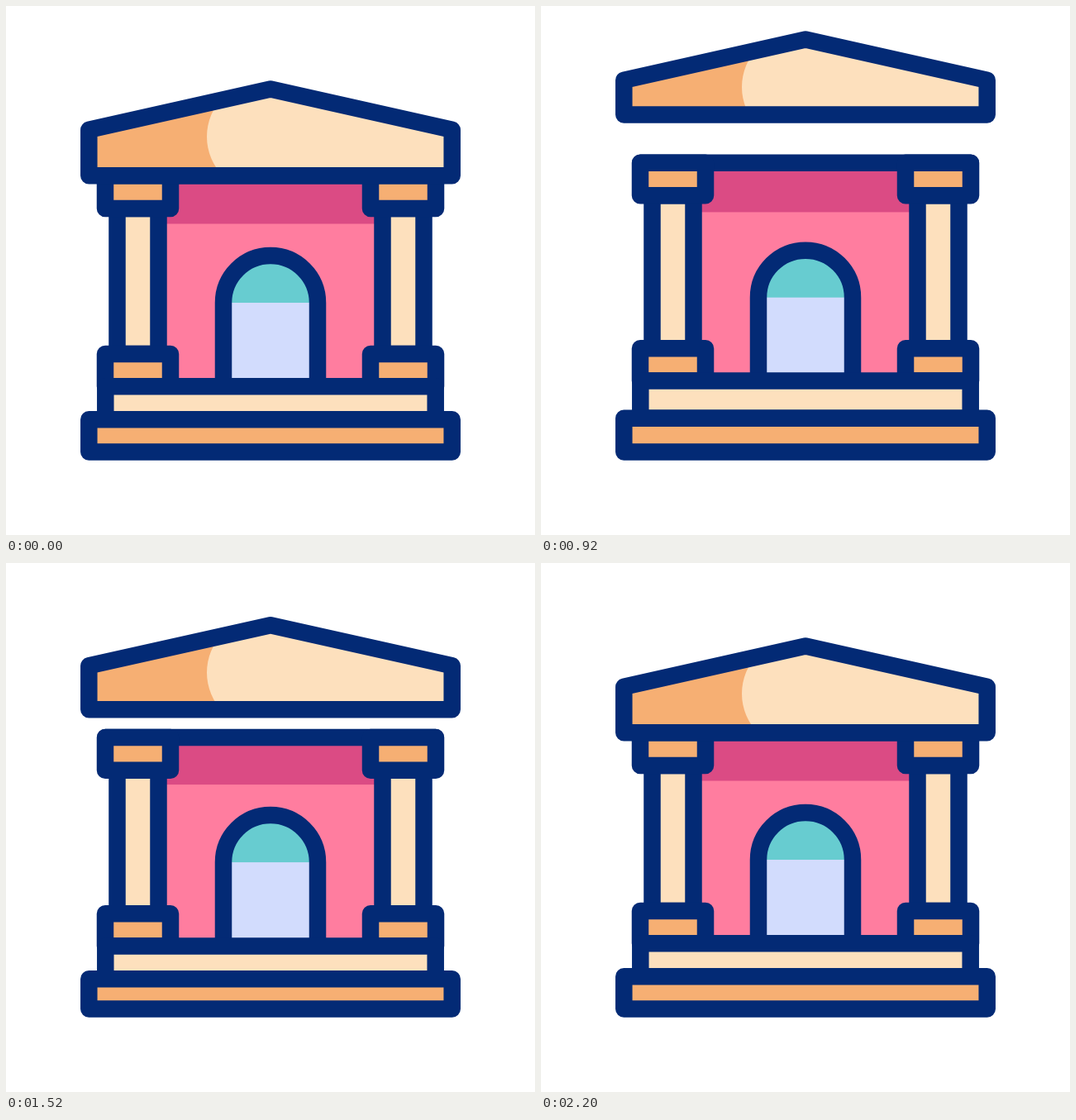
An HTML page with a canvas for the animation above (2.64 s loop, 640 by 640 pixels).

```html
<!DOCTYPE html>
<html lang="en">
<head>
<meta charset="utf-8">
<title>Bouncing bank</title>
<style>
html, body { margin: 0; width: 100%; height: 100%; overflow: hidden; background: #fff; }
canvas { display: block; }
</style>
</head>
<body>
<canvas id="stage" width="640" height="640"></canvas>
<script>
const ctx = document.getElementById('stage').getContext('2d');
const LOOP = 2640, STEP = 40, DELAY = 200;
const NAVY = '#032a75', CREAM = '#fde0bd', ORANGE = '#f6af73', PINK = '#ff7d9f',
      ROSE = '#db4b84', TEAL = '#67ccd0', LILAC = '#d2dcfd';

// Offsets from rest: [squashed, stretched]
const MOVES = {
  roof: [53, -83], cap: [54, -29.8], shade: [47, -26.5],
  door: [24.5, -12.6], floor: [26, -13.4], step: [13, -4.4]
};
const REST = [0, 0, 1], SQUASH = [1, 0, 0], STRETCH = [0, 1, 0];
const KEYS = [
  { from: 0, to: 305, a: REST, b: SQUASH, ease: [1 / 3, 2 / 3] },
  { from: 305, to: 990, a: SQUASH, b: STRETCH, ease: [0.42, 0.325] },
  { from: 990, to: 1665, a: STRETCH, b: SQUASH, ease: [0.6, 0.46] },
  { from: 1665, to: 2000, a: SQUASH, b: REST, ease: [1 / 3, 2 / 3] }
];

const clamp = v => Math.min(1, Math.max(0, v));

// cubic-bezier(x1, 0, x2, 1)
function ease(x, [x1, x2]) {
  let lo = 0, hi = 1;
  for (let i = 0; i < 24; i++) {
    const t = (lo + hi) / 2, r = 1 - t;
    if (3 * x1 * t * r * r + 3 * x2 * t * t * r + t * t * t < x) lo = t; else hi = t;
  }
  return lo * lo * (3 - 2 * lo);
}

function poseAt(time) {
  const t = time - DELAY;
  let w = REST;
  const key = KEYS.find(k => t > k.from && t < k.to);
  if (key) {
    const y = ease((t - key.from) / (key.to - key.from), key.ease);
    w = key.a.map((v, i) => v + (key.b[i] - v) * y);
  }
  const pose = { lift: 21 * clamp((w[1] - 0.52) / 0.48) };
  for (const name in MOVES) pose[name] = MOVES[name][0] * w[0] + MOVES[name][1] * w[1];
  return pose;
}

function fill(color, x1, y1, x2, y2) {
  ctx.fillStyle = color;
  ctx.fillRect(x1, y1, x2 - x1, y2 - y1);
}

function box(color, x1, y1, x2, y2) {
  fill(color, x1, y1, x2, y2);
  ctx.strokeRect(x1, y1, x2 - x1, y2 - y1);
}

function drawDoor(top, floor) {
  const spring = top + 57;
  ctx.beginPath();
  ctx.moveTo(263, floor);
  ctx.lineTo(263, spring);
  ctx.arc(320, spring, 57, Math.PI, 0);
  ctx.lineTo(377, floor);
  ctx.fillStyle = TEAL;
  ctx.fill();
  fill(LILAC, 263, spring, 377, floor);
  ctx.stroke();
}

function drawRoof(shift, lift) {
  const bottom = 205.2 + shift - lift;
  ctx.beginPath();
  ctx.moveTo(100.3, bottom);
  ctx.lineTo(100.3, 149.8 + shift);
  ctx.lineTo(320, 100.6 + shift);
  ctx.lineTo(539.7, 149.8 + shift);
  ctx.lineTo(539.7, bottom);
  ctx.closePath();
  const shape = () => { ctx.fill(); };
  ctx.fillStyle = ORANGE;
  shape();
  ctx.save();
  ctx.clip();
  ctx.beginPath();
  ctx.arc(311, 158 + shift, 68, Math.PI / 2, Math.PI * 1.5);
  ctx.lineTo(560, 90 + shift);
  ctx.lineTo(560, 226 + shift);
  ctx.fillStyle = CREAM;
  ctx.fill();
  ctx.restore();
  ctx.beginPath();
  ctx.moveTo(100.3, bottom);
  ctx.lineTo(100.3, 149.8 + shift);
  ctx.lineTo(320, 100.6 + shift);
  ctx.lineTo(539.7, 149.8 + shift);
  ctx.lineTo(539.7, bottom);
  ctx.closePath();
  ctx.stroke();
}

function draw(p) {
  const cap = 245 + p.cap, top = cap - 39.7, floor = 460.3 + p.floor,
        foot = floor - 39.2, step = 500.2 + p.step;
  fill('#fff', 0, 0, 640, 640);
  ctx.strokeStyle = NAVY;
  ctx.lineWidth = 20.5;
  ctx.lineJoin = ctx.lineCap = 'round';

  fill(PINK, 184, top, 456, floor);
  fill(ROSE, 184, top, 456, 263.5 + p.shade);
  ctx.beginPath();
  ctx.moveTo(120.3, top);
  ctx.lineTo(519.7, top);
  ctx.stroke();
  drawDoor(302 + p.door, floor);

  for (const x of [0, 321]) {
    box(CREAM, 134.5 + x, cap, 184.5 + x, foot);
    box(ORANGE, 120 + x, top, 199 + x, cap);
    box(ORANGE, 120 + x, foot, 199 + x, floor);
  }
  box(CREAM, 120.3, floor, 519.7, step);
  box(ORANGE, 100.3, step, 539.7, 539.4);
  drawRoof(p.roof, p.lift);
}

const start = performance.now();
function tick() {
  const t = (performance.now() - start) % LOOP;
  draw(poseAt(Math.floor(t / STEP) * STEP));
  requestAnimationFrame(tick);
}
tick();
</script>
</body>
</html>
```
